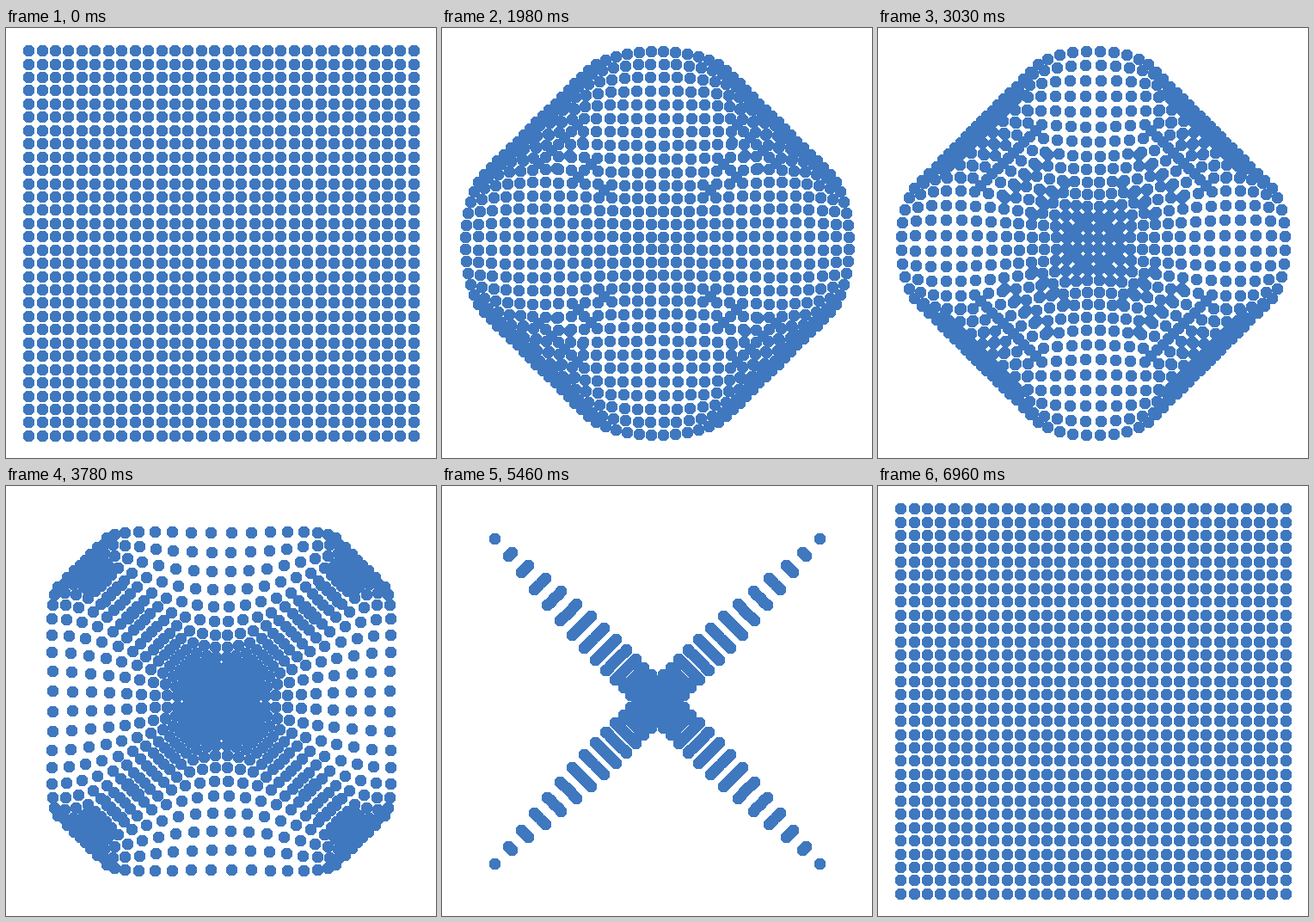
These frames come from a looping animation (500 by 500 pixels, 6990 ms). An HTML page with a canvas:

```html
<!DOCTYPE html>
<html>
<head>
<meta charset="utf-8">
<style>
html, body { margin: 0; width: 100%; height: 100%; overflow: hidden; background: #fff; }
canvas { display: block; }
</style>
</head>
<body>
<canvas id="stage" width="500" height="500"></canvas>
<script>
const ctx = document.getElementById('stage').getContext('2d');
const N = 30, K = N - 1, HALF = 223.88, MID = 250;
const STEP_MS = 30, STEPS = 233, TURN = 116;

// Each dot obeys x'' = -sin x cos y, y'' = -cos x sin y, starting at rest.
// Along the diagonals x + y and x - y this splits into plain pendulums,
// one for each diagonal k = -K..K. Returns the angle at every 0.1 s.
function swing(angle) {
  const sub = 20, dt = 0.1 / sub, path = [angle];
  let speed = 0;
  for (let s = 0; s < TURN; s++) {
    for (let n = 0; n < sub; n++) {
      speed -= Math.sin(angle) * dt / 2;
      angle += speed * dt;
      speed -= Math.sin(angle) * dt / 2;
    }
    path.push(angle);
  }
  return path;
}

const swings = Array.from({ length: 2 * K + 1 }, (_, n) => swing(2 * (n - K) / K));

// Crisp 13 px octagon built from centred bars
function dot(x, y) {
  for (let n = 3; n <= 6; n++) {
    const h = 9 - n;
    ctx.fillRect(x - n, y - h, 2 * n + 1, 2 * h + 1);
  }
}

const place = v => MID + Math.round(HALF * v);

// The swing runs forward to the turn, then back again
function draw(step) {
  const s = Math.min(step, 2 * TURN - step);
  ctx.fillStyle = '#fff';
  ctx.fillRect(0, 0, 500, 500);
  ctx.fillStyle = '#3f78bf';
  for (let i = 0; i < N; i++) {
    for (let j = 0; j < N; j++) {
      const a = swings[i + j][s], b = swings[i - j + K][s];
      dot(place((a + b) / 2), place((a - b) / 2));
    }
  }
}

const start = performance.now();
function tick() {
  const time = performance.now() - start;
  draw(Math.floor(time / STEP_MS) % STEPS);
  requestAnimationFrame(tick);
}
tick();
</script>
</body>
</html>
```
